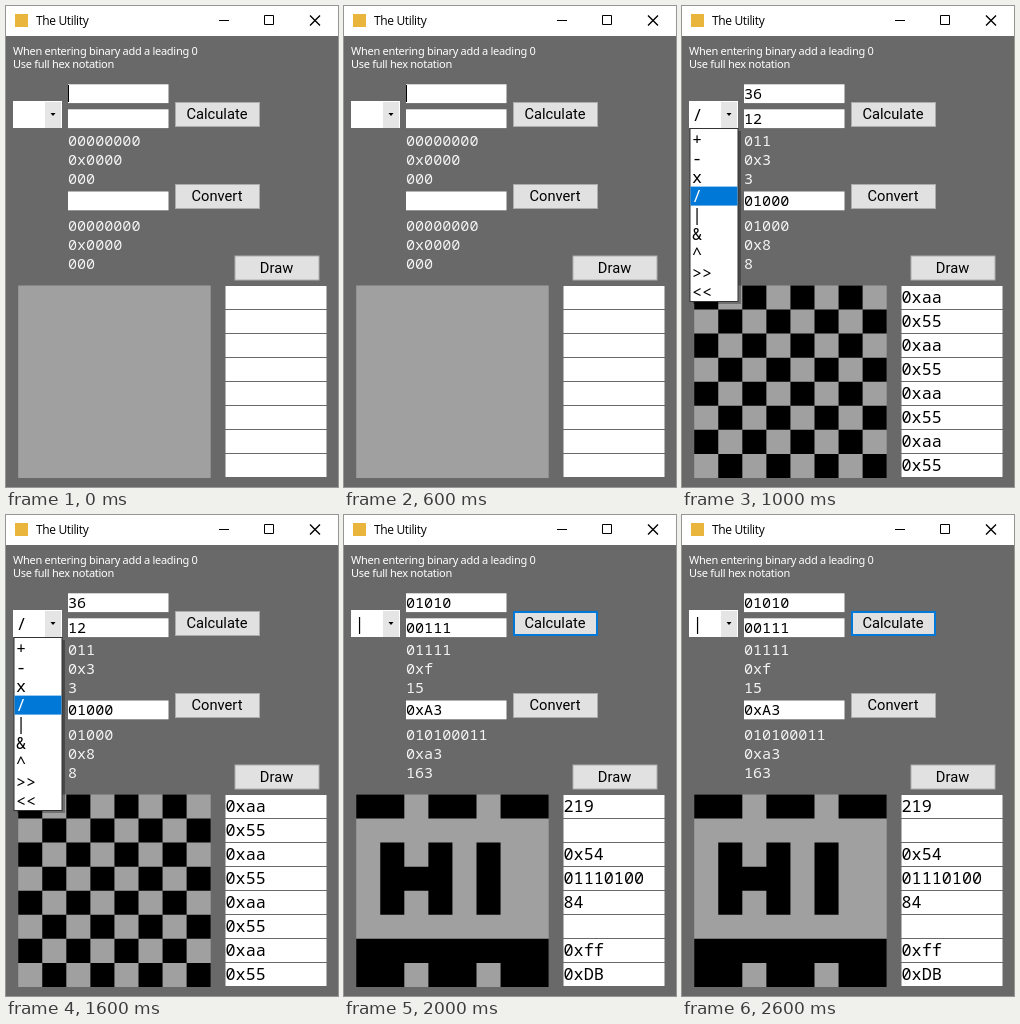
Animation of 332 by 481 pixels, one loop 3000 ms. Source, as an HTML page:

```html
<!DOCTYPE html>
<html lang="en">
<head>
<meta charset="utf-8">
<title>The Utility</title>
<style>
  html, body { margin: 0; width: 100%; height: 100%; overflow: hidden; background: #696969; }
  svg { display: block; width: 332px; height: 481px; }
  text { white-space: pre; }
  .title { font: 12px "Open Sans", sans-serif; letter-spacing: -.35px; }
  .note { font: 11px "Noto Sans", sans-serif; letter-spacing: -.28px; fill: #fff; }
  .button { font: 14.7px Roboto, sans-serif; text-anchor: middle; }
  .mono { font: 15.1px "Noto Sans Mono", monospace; }
  .wide { font: 16.8px "Noto Sans Mono", monospace; }
  .light { font-weight: 500; fill: #f4f4f4; }
</style>
</head>
<body>
<svg id="stage" viewBox="0 0 332 481"></svg>
<script>
const NS = "http://www.w3.org/2000/svg";
const stage = document.getElementById("stage");
const STEP = 1000, CELL = 24.06, LEFT = 12.2, TOP = 279.5, BLUE = "#0078d7";
const OPERATORS = ["+", "-", "x", "/", "|", "&", "^", ">>", "<<"];

const SCENES = [
  { op: "", caret: true, inputs: ["", "", ""],
    results: ["00000000", "0x0000", "000", "00000000", "0x0000", "000"], rows: [] },
  { op: "/", open: true, inputs: ["36", "12", "01000"],
    results: ["011", "0x3", "3", "01000", "0x8", "8"],
    rows: ["0xaa", "0x55", "0xaa", "0x55", "0xaa", "0x55", "0xaa", "0x55"] },
  { op: "|", focus: true, inputs: ["01010", "00111", "0xA3"],
    results: ["01111", "0xf", "15", "010100011", "0xa3", "163"],
    rows: ["219", "", "0x54", "01110100", "84", "", "0xff", "0xDB"] }
];

function add(parent, tag, attrs, content) {
  const el = document.createElementNS(NS, tag);
  for (const key in attrs) el.setAttribute(key, attrs[key]);
  if (content) el.textContent = content;
  return parent.appendChild(el);
}
const rect = (g, x, y, width, height, fill, more) =>
  add(g, "rect", { x, y, width, height, fill, ...more });
const line = (g, d, width) =>
  add(g, "path", { d, fill: "none", stroke: "#000", "stroke-width": width });
const label = (g, x, y, style, content) =>
  add(g, "text", { x, y, class: style }, content);

function button(x, y, name) {
  rect(stage, x + .5, y + .5, 84, 24, "#e1e1e1", { stroke: "#adadad" });
  label(stage, x + 42, y + 17, "button", name);
}

// A leading zero marks binary; 0x marks hex.
const parse = s => /^0[01]+$/.test(s) ? parseInt(s, 2) : Number(s);

function drawWindow() {
  rect(stage, 0, 0, 332, 481, "#696969");
  rect(stage, 0, 0, 332, 30, "#fff");
  rect(stage, 9, 8, 13, 13, "#e9b53c");
  label(stage, 30, 19, "title", "The Utility");
  line(stage, "M213 14.5h10M258.5 9.5h9v9h-9z", 1);
  line(stage, "M304 9.5l10 10M314 9.5l-10 10", 1.4);
  label(stage, 7, 49, "note", "When entering binary add a leading 0");
  label(stage, 7, 62, "note", "Use full hex notation");

  rect(stage, 7, 95, 49, 27, "#fff");
  rect(stage, 39, 96, 16, 26, "#e5e5e5");
  add(stage, "path", { d: "M44.5 107h5l-2.5 3z" });
  for (const y of [78.3, 103.3, 185.5]) rect(stage, 62, y, 100.5, 18.8, "#fff");
  button(169, 96, "Calculate");
  button(169, 178, "Convert");
  button(228.5, 249.5, "Draw");

  rect(stage, LEFT, TOP, 8 * CELL, 8 * CELL, "#a0a0a0");
  for (let i = 0; i < 8; i++) rect(stage, 219.5, 280 + i * 24, 101, 23, "#fff");
}

function drawMenu(g, chosen) {
  rect(g, 11, 125, 48, 173, "#000", { opacity: .3 });
  rect(g, 8, 122.5, 48, 173, "#fff", { stroke: "#333" });
  OPERATORS.forEach((op, i) => {
    const y = 123.3 + i * 19.1, on = op === chosen;
    if (on) rect(g, 8.5, y, 47, 19, BLUE);
    add(g, "text", { x: 10, y: y + 15.5, class: "wide", fill: on ? "#fff" : "#000" }, op);
  });
}

function drawScene(scene) {
  const g = add(stage, "g", {});
  scene.inputs.forEach((s, i) => label(g, 62, [93, 118, 200][i], "mono", s));
  scene.results.forEach((s, i) =>
    label(g, 62, [140, 159, 178, 225, 244, 263][i], "mono light", s));
  let cells = "";
  scene.rows.forEach((s, r) => {
    const y = TOP + r * CELL, bits = parse(s);
    label(g, 219.5, y + 17, "wide", s);
    for (let c = 0; c < 8; c++)
      if (bits >> (7 - c) & 1) cells += `M${LEFT + c * CELL} ${y}h${CELL}v${CELL}h${-CELL}z`;
  });
  add(g, "path", { d: cells });
  label(g, 10.5, 115, "wide", scene.op);
  if (scene.caret) rect(g, 62, 79, 1, 17, "#000");
  if (scene.focus) rect(g, 170, 97, 83, 23, "none", { stroke: BLUE, "stroke-width": 2 });
  if (scene.open) drawMenu(g, scene.op);
  return g;
}

drawWindow();
SCENES.map(drawScene).forEach((g, i, all) => g.animate([
  { opacity: 1, offset: 0, easing: "step-end" },
  { opacity: 0, offset: 1 / all.length, easing: "step-end" },
  { opacity: 0, offset: 1 }
], { duration: all.length * STEP, delay: (i - all.length) * STEP, iterations: Infinity }));
</script>
</body>
</html>
```
